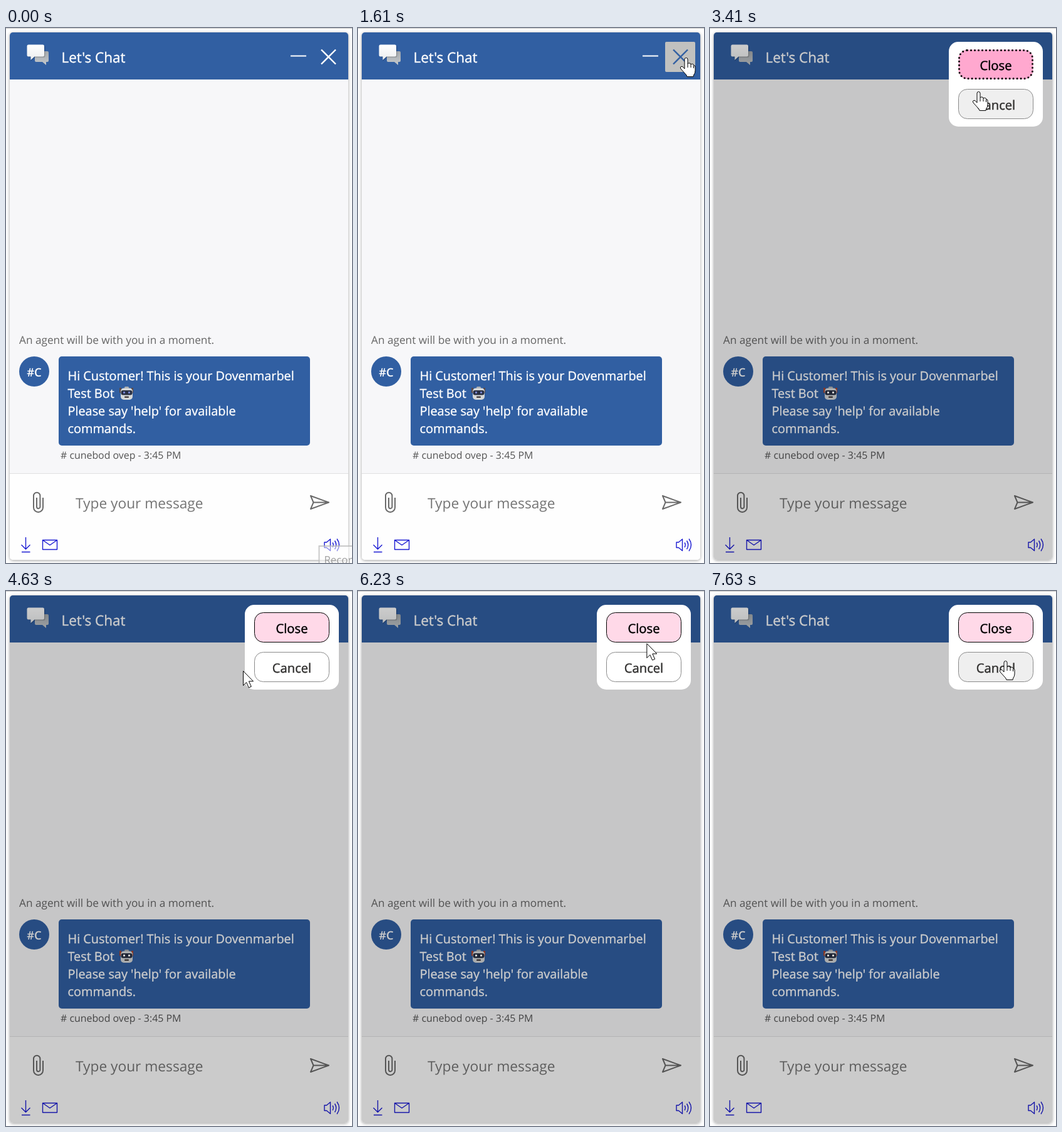
An HTML page for the animation above (8000 ms loop, 552 px wide and 852 px high).

```html
<!DOCTYPE html>
<html lang="en">
<head>
<meta charset="utf-8">
<title>Chat widget</title>
<style>
  html, body { margin: 0; width: 100%; height: 100%; overflow: hidden; background: #fff; }
  svg { display: block; width: 552px; height: 852px; }
  text { font-family: "Open Sans", "Noto Sans", sans-serif; text-rendering: geometricPrecision; white-space: pre; }
  .line { fill: none; stroke-linejoin: round; }
  .widget { filter: drop-shadow(0 1px 2.5px rgba(0,0,0,.38)); }
  .light { fill: #fff; stroke: #fff; stroke-width: .35; }
  .message { font-size: 19.85px; }
  .button-label { font-size: 20.2px; text-anchor: middle; stroke-width: .45; }
  .eyes { fill: #7280c8; }
  .ears { fill: #5b4a48; }
  .modal .eyes { fill: #fff; }
  .modal .ears { fill: #a8452f; }
</style>
</head>
<body>
<svg viewBox="0 0 552 852">
  <defs>
    <clipPath id="frame"><rect x="6" y="7" width="540" height="840" rx="5"/></clipPath>
    <linearGradient id="backBubble" x2="0" y2="1">
      <stop stop-color="#a3a8ad"/><stop offset="1" stop-color="#c5c9cc"/>
    </linearGradient>
    <linearGradient id="frontBubble" x2="0" y2="1">
      <stop stop-color="#fff"/><stop offset="1" stop-color="#eceeef"/>
    </linearGradient>
  </defs>

  <rect width="552" height="852" fill="#fff"/>
  <rect width="552" height="1" fill="#c9c9c9"/>

  <g id="chat">
    <rect class="widget" x="6" y="7" width="540" height="840" rx="5" fill="#f7f7f9"/>
    <g clip-path="url(#frame)">
      <rect x="6" y="7" width="540" height="75" fill="#315fa2"/>
      <rect x="6" y="709" width="540" height="138" fill="#fefefe"/>
      <rect x="6" y="709" width="540" height="1" fill="#e0e0e1"/>
    </g>

    <path d="M48 37h18q2 0 2 2v13q0 2-2 2h-2v5l-6-5h-10q-2 0-2-2v-13q0-2 2-2z" fill="url(#backBubble)"/>
    <path d="M36 28h24q2.5 0 2.5 2.5v14q0 2.5-2.5 2.5h-14l-6.5 6v-6h-3z" opacity=".16"/>
    <path d="M36 26.500h22.500q2.500 0 2.500 2.500v14q0 2.500-2.500 2.500h-13l-6 5.500v-5.500h-3.500q-2.500 0-2.500-2.500v-14q0-2.500 2.500-2.500z" fill="url(#frontBubble)"/>
    <text class="light" x="88.500" y="55" font-size="22.500">Let's Chat</text>

    <path d="M454 44.500h25" class="line" stroke="#fff" stroke-width="2"/>
    <rect id="exitHover" x="490" y="22" width="48" height="48" rx="2" fill="#c1c1bf"/>
    <path id="exitIcon" d="M503 34.500l23 23m0-23l-23 23" class="line" stroke-width="2.400"/>

    <text x="21" y="503" font-size="17.230" fill="#666">An agent will be with you in a moment.</text>
    <circle cx="45" cy="547" r="24" fill="#315fa2"/>
    <text x="45" y="554.500" font-size="18.500" font-weight="600" fill="#fff" text-anchor="middle">#C</text>
    <rect x="84" y="523" width="401" height="142" rx="5" fill="#315fa2"/>
    <g class="message light">
      <text x="98.500" y="561">Hi Customer! This is your Dovenmarbel</text>
      <text x="98.500" y="589">Test Bot</text>
      <text x="98.500" y="617">Please say 'help' for available</text>
      <text x="98.500" y="645">commands.</text>
    </g>
    <g>
      <path class="ears" d="M181 573h3v8h-3zM200 573h3v8h-3z"/>
      <rect x="189" y="571" width="7" height="4" rx="1.500" fill="#a9adb0"/>
      <rect x="183" y="573.500" width="19" height="18.500" rx="5" fill="#d5d8d9"/>
      <rect x="183.500" y="577" width="18" height="7.500" rx="3" fill="#272e42"/>
      <path class="eyes" d="M187 579h3v3h-3zM195 579h3v3h-3z"/>
      <rect x="189" y="586.500" width="7" height="2.500" rx="1" fill="#4a4242"/>
    </g>
    <text x="87" y="686" font-size="15.900" fill="#555"># cunebod ovep - 3:45 PM</text>

    <text x="111" y="765" font-size="22.700" fill="#757575">Type your message</text>
    <g class="line" stroke="#6a6a6a" stroke-width="2">
      <path d="M59 748v15.500a7.500 7.500 0 0 1-15 0v-18.500a5.200 5.200 0 0 1 10.400 0v17.500a2.700 2.700 0 0 1-5.400 0v-14.500"/>
      <path d="M486 745l29 10.500-29 10.500 4.500-10.500zm4.500 10.500h24"/>
    </g>
    <g class="line" stroke="#1a1ad2" stroke-width="1.400">
      <path d="M31.500 811v19m-7-7l7 7 7-7M25 834.500h13.500"/>
      <path d="M58.500 815.500h23v15h-23zl11.500 8 11.500-8"/>
      <path d="M508 819h3.500l6-5v18.500l-6-5h-3.500z"/>
      <path d="M521 819.500q2.500 3.700 0 7.500m3.500-10.500q4.500 6.700 0 13.500m3.500-16.500q7 9.700 0 19.500"/>
    </g>
  </g>

  <g id="dialog">
    <rect x="6" y="7" width="540" height="840" rx="5" opacity=".2"/>
    <rect x="381" y="22" width="150" height="135" rx="15" fill="#fff"/>
    <rect id="closeFill" x="396.500" y="34.500" width="119" height="47" rx="14" stroke="#000"/>
    <rect id="focusRing" x="397.500" y="35.500" width="117" height="45" rx="13" fill="none" stroke="#000"
          stroke-width="3" stroke-linecap="round" stroke-dasharray="0 6"/>
    <text class="button-label" x="456" y="67" stroke="#000">Close</text>
    <rect id="cancelFill" x="396.500" y="97.500" width="119" height="47" rx="14" stroke="#8a8a8a"/>
    <text class="button-label" x="456" y="130" fill="#323130" stroke="#323130">Cancel</text>
  </g>

  <g id="tooltip" opacity=".8">
    <rect x="499.500" y="825" width="70" height="40" fill="#fff" fill-opacity=".6" stroke="#bdbdbd" stroke-width="2"/>
    <text x="507.500" y="853" font-size="16.800" fill="#8c8c8c">Record</text>
  </g>

  <g id="cursor" fill="#fff" stroke="#000" stroke-linejoin="round">
    <path id="arrow" d="M.5 .5v23l5-5 3.800 8.500 4-1.800-3.800-8.400h7z"/>
    <g id="hand">
      <path d="M-2.500 3a2.500 2.500 0 0 1 5 0v7q1-1.500 3-1 2 .3 2 2 1-1 2.700-.6 2 .3 2 2.200 2.300-.4 2.300 2.400v6q0 4-2.500 7l-.5 2.500h-10l-1-2.500-9-10q-1.500-2.200 .2-3.400 2-1 3.600 .8l2.200 2.600z"/>
      <path d="M2.500 10v6M7.500 11v5M12 13v4" fill="none"/>
    </g>
  </g>
</svg>
<script>
  const DURATION = 8000;
  const STEP = 200;        // the picture refreshes five times a second
  const MODAL_AT = 1800;
  const BLUR_AT = 4600;

  // The pointer enters from below, then glides to each stop and rests there.
  const entry = { x: 546, y: 852 };
  const stops = [
    { from: 400, to: 1600, x: 523.5, y: 47 },
    { from: 2000, to: 3400, x: 428.5, y: 101 },
    { from: 3400, to: 4000, x: 395, y: 92 },
    { from: 4400, to: 4600, x: 378, y: 127 },
    { from: 4600, to: 5000, x: 433.5, y: 68.5 },
    { from: 5000, to: 5800, x: 454, y: 124 },
    { from: 6000, to: 6600, x: 463, y: 66 },
    { from: 6800, to: 7600, x: 471.5, y: 111 }
  ];

  const areas = {
    exit: { x: 490, y: 22, w: 48, h: 48 },
    close: { x: 396, y: 34, w: 120, h: 48 },
    cancel: { x: 396, y: 97, w: 120, h: 48 }
  };

  const $ = id => document.getElementById(id);
  const show = (id, on) => $(id).setAttribute('visibility', on ? 'visible' : 'hidden');
  const set = (id, name, value) => $(id).setAttribute(name, value);
  const clamp = v => Math.min(1, Math.max(0, v));
  const easeOut = p => 1 - (1 - p) ** 3;

  function pointerAt(t) {
    return stops.reduce((pos, stop) => {
      const k = easeOut(clamp((t - stop.from) / (stop.to - stop.from)));
      return { x: pos.x + (stop.x - pos.x) * k, y: pos.y + (stop.y - pos.y) * k };
    }, entry);
  }

  const inside = (p, a) => p.x >= a.x && p.x <= a.x + a.w && p.y >= a.y && p.y <= a.y + a.h;

  function render(time) {
    const t = Math.floor(time / STEP) * STEP;
    const modal = t >= MODAL_AT;
    const focused = t < BLUR_AT;
    const pointer = pointerAt(t);
    const onExit = !modal && inside(pointer, areas.exit);
    const onClose = modal && inside(pointer, areas.close);
    const onCancel = modal && inside(pointer, areas.cancel);
    const pointing = onExit || onClose || onCancel;

    set('chat', 'class', modal ? 'modal' : '');
    show('exitHover', onExit);
    set('exitIcon', 'stroke', onExit ? '#315fa2' : '#fff');

    show('dialog', modal);
    show('focusRing', modal && focused);
    set('closeFill', 'stroke-opacity', focused ? 0 : 1);
    set('closeFill', 'fill', focused || onClose ? '#ffa8cf' : '#ffd9e8');
    set('cancelFill', 'fill', onCancel ? '#efefef' : '#fff');

    show('tooltip', t < STEP);
    show('arrow', !pointing);
    show('hand', pointing);
    set('cursor', 'transform', `translate(${pointer.x} ${pointer.y})`);
  }

  const start = performance.now();
  function tick() {
    render((performance.now() - start) % DURATION);
    requestAnimationFrame(tick);
  }
  tick();
</script>
</body>
</html>
```
